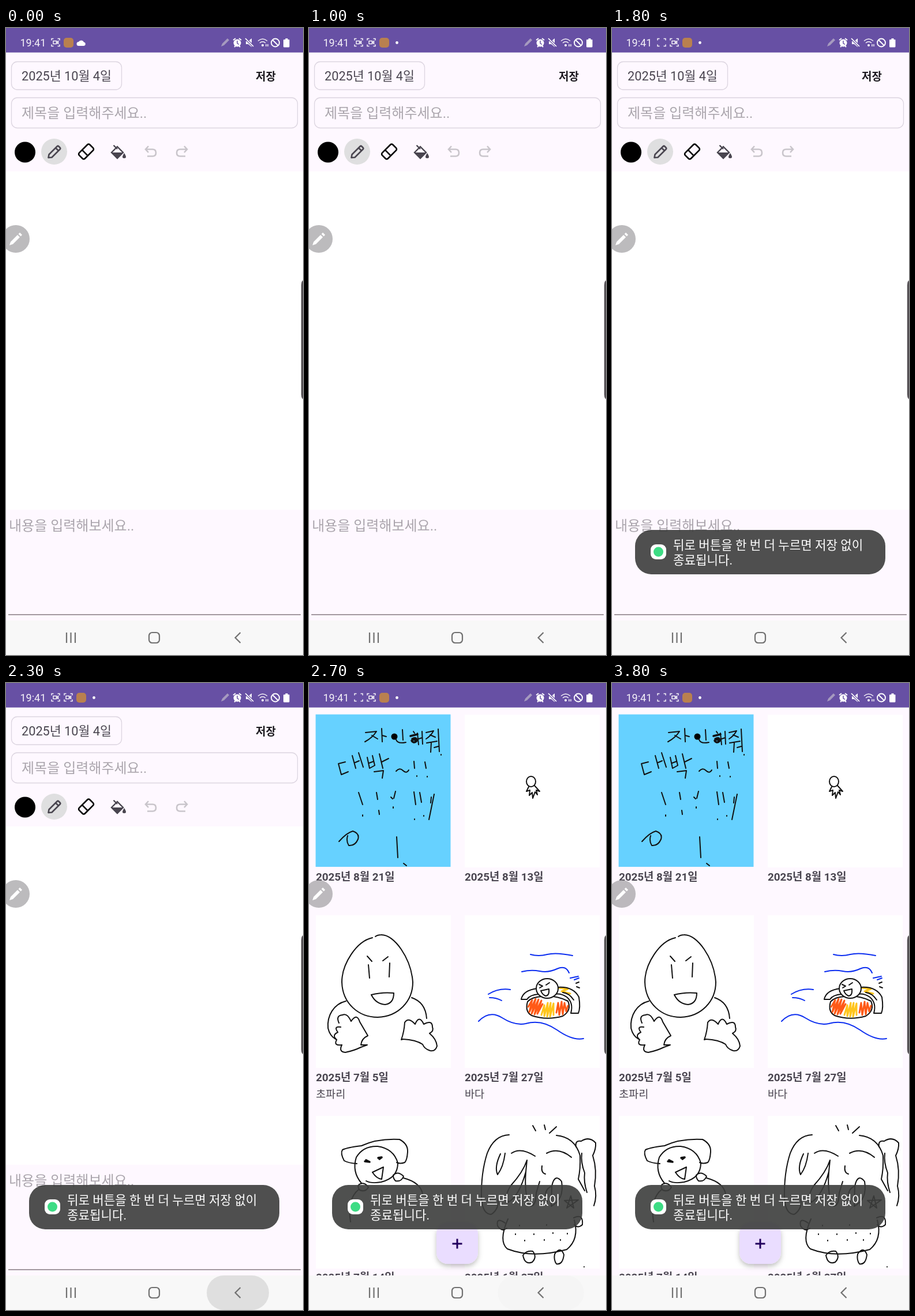
Recreate the animation shown at these times as an HTML page. Size 515 by 1088 pixels, loop 4 s.

```html
<!DOCTYPE html>
<html lang="ko">
<head>
<meta charset="utf-8">
<title>그림일기</title>
<style>
  html, body { margin: 0; width: 100%; height: 100%; overflow: hidden; background: #fef8ff; }
  svg { display: block; width: 515px; height: 1088px; }
  text { font-family: Roboto, "Noto Sans CJK KR", "Noto Sans CJK", sans-serif; fill: #49454f; }
  .hint { font-size: 24px; fill: #aaa5ac; }
  .date { font-size: 18.8px; font-weight: 700; }
  .name { font-size: 18.6px; }
  .line { fill: none; stroke: #111; stroke-width: 2; stroke-linecap: round; stroke-linejoin: round; }
  .bold { stroke-width: 3.6; }
  .sea { stroke: #0b2df0; }
  .red { stroke: #ff5a17; stroke-width: 3; }
  .yellow { stroke: #ffc51c; stroke-width: 3; }
  .box { fill: none; stroke: #dcd5e0; stroke-width: 1.3; }
  .white { fill: #fff; }
  .thin { fill: none; stroke: #f3f0f6; stroke-width: 1.5; }
</style>
</head>
<body>
<svg viewBox="0 0 515 1088">
  <defs>
    <path id="frame" class="thin" d="M79 21.500V18.500H82.500M89.500 18.500H93V21.500M93 28.500V31.500H89.500M82.500 31.500H79V28.500"/>
    <path id="cam" class="thin" d="M82 22.500h5.500v5H82zM87.500 25l3-2.200v4.400z"/>
    <filter id="soft" x="-30%" y="-30%" width="160%" height="170%">
      <feDropShadow dx="0" dy="4" stdDeviation="4" flood-opacity=".25"/>
    </filter>
  </defs>

  <rect width="515" height="1088" fill="#fef8ff"/>

  <g id="list">
    <rect x="11.500" y="54.500" width="234" height="264.500" fill="#66d1ff"/>
    <path class="white" d="M270 55h234v265H270zM12 403h234v265H12zM270 403h234v265H270zM12 751h234v265H12zM270 751h234v265H270z"/>

    <!-- handwriting -->
    <path class="line" d="M98 86L117 84Q110 95 97 102M109 91L119 97M126 79L127 102M127 91L134 93
      M162 81L163 99M151 98Q153 106 168 103M181 84L183 87M188 87L190 107M190 97L196 95M196 84L197 106"/>
    <path class="line bold" d="M176 92L188 89M179 97q7-4 8 3q-5 6-9 0q4-4 8 1"/>
    <path class="line" d="M203 86L216 83Q211 92 203 97M210 90L219 94M204 104L222 101M212 103L211 120M224 80L226 119M217 112L224 110M229 124v1"/>
    <path class="line" d="M63 137L51 140L56 159L68 154M75 126L81 148M80 138L87 135M86 121L94 146M101 129L105 148L114 143L110 126M104 139L112 136
      M122 123L128 148M126 137L138 131M113 154L129 152L127 165M151 153Q157 146 163 152T173 151M182 136L183 148M187 161v1M201 137L203 148M205 162v1"/>
    <path class="line" d="M86 190L93 211M93 229v2M117 190L119 202M121 221L122 228M150 188L147 200M142 198L145 201M146 215v2
      M182 189L185 211M183 236v1M192 190L195 207M199 230v1M217 193L208 237M212 198L211 208
      M52 275Q65 260 76 257Q88 261 85 271Q80 283 69 282Q64 274 67 265M152 267L154 303M164 313L169 317"/>
    <circle cx="148" cy="93" r="5.500"/>

    <!-- small figure -->
    <path class="line" d="M377 171A8 9 0 1 1 393 171A8 9 0 1 1 377 171M381 180L377 188L383 186L382 195L387 190L388 200L392 189L396 194L394 186L400 188L391 178"/>

    <!-- egg-shaped character -->
    <path class="line" d="M110 442C82 448 57 488 57 519C58 556 86 580 119 580C155 579 180 552 180 519C177 478 148 436 125 437Q119 437 115 440"/>
    <path class="line" d="M101 474L109 483M128 482L137 475M103 489L105 512M140 486L139 510M108 541Q127 536 147 538Q147 556 132 558Q116 557 108 541"/>
    <path class="line" d="M64 552C43 557 31 577 33 599Q36 612 46 618M178 546Q202 554 204 582
      M52 590Q46 577 58 576Q66 572 73 587Q83 572 88 588L102 612Q91 617 90 628L101 628L90 632Q78 638 63 641Q51 640 57 628Q42 630 48 619Q39 611 50 606Q42 595 55 597
      M163 618L160 619Q165 605 166 589Q172 579 184 592Q191 575 199 592Q214 584 214 597Q217 604 209 608Q221 618 222 630Q219 640 210 638Q200 635 197 627Q185 619 163 618"/>

    <!-- swimmer -->
    <path class="line sea" d="M384 471Q398 475 413 471T457 473M369 501Q385 497 400 500T430 496T451 503M349 532Q329 529 311 540M313 546Q325 546 334 551M294 587Q313 567 335 581T376 591Q403 583 430 602T476 617M453 512L467 509M460 515L468 512"/>
    <path class="line white" style="fill:#fff" d="M379 553Q374 570 386 577Q412 586 440 578Q456 568 449 552Q427 541 403 544Q386 545 379 553"/>
    <path class="line red" d="M380 562L387 550L382 571L393 548L386 574L398 549L391 575L403 551L396 574L405 557M429 572L432 555L434 576L438 553L440 575L443 555L446 570L449 560"/>
    <path class="line yellow" d="M403 576L408 559L408 578L414 555L413 579L419 555L418 579L424 556L424 576M433 529L449 531L438 535L453 539"/>
    <path class="line" style="fill:#fff" d="M396 530Q371 533 368 549L378 549Q383 541 398 540"/>
    <path class="line" d="M431 528Q458 526 468 545Q471 564 467 573L454 573Q459 555 447 545Q437 538 426 540M440 537Q451 538 459 550M463 521L468 519M464 527L469 529"/>
    <ellipse class="line" style="fill:#fff" cx="413" cy="530" rx="19" ry="17"/>
    <path class="line" d="M399 523L405 526L400 529M411 524L417 520M402 534L416 531Q417 543 410 543Q404 540 402 534"/>

    <!-- character with a hat -->
    <path class="line" d="M83 834Q68 833 61 829Q54 816 58 810Q66 806 91 803Q119 790 157 792Q172 800 171 814Q170 828 166 832Q158 835 152 832"/>
    <path class="line" d="M91 868Q74 848 82 823Q94 803 119 804Q147 808 154 833Q154 859 125 866Q108 869 99 864
      M110 849L129 840L126 861Q117 860 110 849M87 870Q96 865 103 875Q98 884 88 880Q83 874 87 870M146 854Q154 846 164 856Q160 866 150 864Q146 860 146 854
      M86 879Q66 895 72 935M164 859Q194 867 197 887"/>
    <path class="line bold" d="M97 830L105 831L99 828M120 824L126 823L122 826"/>

    <!-- long-haired character -->
    <path class="line" d="M388 768L393 777M408 767L410 775M429 770L417 781
      M347 784Q321 785 309 816Q298 850 299 894Q301 922 316 922Q329 914 328 896
      M332 817Q321 840 327 853Q337 840 340 816M351 816Q367 805 392 821
      M378 828Q371 849 350 872Q337 892 346 901Q365 889 376 848L378 828M376 848Q373 884 382 906Q393 912 394 885L400 865"/>
    <path class="line" d="M404 838Q402 850 410 852M412 816Q433 805 455 823M429 785Q461 788 470 820Q471 843 467 861L478 881
      M463 805Q461 793 472 795Q486 786 497 798Q498 808 492 820Q500 845 495 873Q500 890 494 907M473 816Q471 832 478 850Q476 866 482 884
      M413 900Q405 880 421 873L420 908Q443 896 438 865Q426 850 421 873"/>
    <path class="line" d="M340 937Q324 926 327 942Q334 953 343 946M345 930Q328 969 344 982Q388 999 447 983Q469 965 460 932M459 928Q476 920 474 940Q466 947 460 940
      M447 911L454 890L459 911L443 898L467 897L447 911
      M371 993Q377 984 388 986Q396 996 387 1005Q374 1010 371 993M426 991Q436 976 442 992Q440 1010 429 1008Q424 1001 426 991"/>
    <path class="line" d="M358 956v1M374 967v1M390 956v1M408 966v1M423 954v1M436 966v1M448 955v1M365 941v1M412 940v1M477 1013v.200"/>

    <text class="date" x="12" y="343">2025년 8월 21일</text>
    <text class="date" x="270" y="343">2025년 8월 13일</text>
    <text class="date" x="12" y="691">2025년 7월 5일</text>
    <text class="date" x="270" y="691">2025년 7월 27일</text>
    <text class="name" x="12" y="720">초파리</text>
    <text class="name" x="270" y="720">바다</text>
    <text class="date" x="12" y="1038">2025년 7월 14일</text>
    <text class="date" x="270" y="1038">2025년 6월 27일</text>
    <rect x="221" y="936" width="72" height="72" rx="20" fill="#eaddff" filter="url(#soft)"/>
    <path d="M248.500 973h17M257 964.500v17" stroke="#21005d" stroke-width="3"/>
  </g>

  <g id="editor">
    <rect width="515" height="1030" fill="#fef8ff"/>
    <rect class="box" x="9.500" y="58.500" width="191" height="48.500" rx="10"/>
    <rect class="box" x="9.500" y="121" width="496" height="52.500" rx="10"/>
    <text x="27" y="91" font-size="21.700">2025년 10월 4일</text>
    <text x="433" y="90.500" font-size="19" font-weight="700" style="fill:#1d1b20">저장</text>
    <text class="hint" x="27" y="156">제목을 입력해주세요..</text>
    <circle cx="33" cy="215.500" r="18"/>
    <circle cx="83.500" cy="214.500" r="22.500" fill="#dfdfe0"/>
    <path d="M73.500 225L74.500 219.500L88.500 205.500Q90 204 91.500 205.500L93.500 207.500Q95 209 93.500 210.500L79.500 224.500ZM86 208L91 213" fill="none" stroke="#49454f" stroke-width="2.600" stroke-linejoin="round"/>
    <g transform="rotate(-45 139 214.500)" fill="none" stroke="#000" stroke-width="2.600">
      <rect x="126" y="207.500" width="26" height="14" rx="3"/>
      <path d="M136 207.500v14"/>
    </g>
    <path d="M186.500 203.500L193 210M183 216L193 206L203 216L193 226Z" fill="none" stroke="#49454f" stroke-width="2.400"/>
    <path d="M182 216h22l-11 11zM205 217q6 9 0 9q-6 0 0-9" fill="#49454f"/>
    <g fill="none" stroke="#c9c5cb" stroke-width="2.600">
      <path id="undo" d="M247 205l-5 5.500 5 5.500M242 210.500h12q6 0 6 6t-6 6h-9"/>
      <use href="#undo" transform="matrix(-1 0 0 1 556 0)"/>
    </g>
    <rect class="white" y="249" width="515" height="587"/>
    <text class="hint" x="5" y="871.500">내용을 입력해보세요..</text>
    <path d="M4 1018h507" stroke="#85797f" stroke-width="1.600"/>
  </g>

  <circle cx="17" cy="366" r="24" fill="#a6a4a7" opacity=".75"/>
  <path d="M6 377l2-6 12-12 4 4-12 12zM21.500 357.500l2.500-2.500 4 4-2.500 2.500z" fill="#fff"/>
  <path d="M515 438q-3 2-3 8v190q0 6 3 8z" fill="#4b464b" stroke="#8b868b" stroke-width=".6"/>

  <!-- navigation bar -->
  <rect y="1028" width="515" height="60" fill="#f8f8f8"/>
  <rect id="press" y="1028" height="60" rx="30" fill="#dfdfdf"/>
  <g fill="none" stroke="#717171" stroke-width="2.200">
    <path d="M105 1049v18M112.500 1049v18M120 1049v18M406.500 1049l-9 9 9 9"/>
    <rect x="248" y="1049" width="18" height="18" rx="5.500"/>
  </g>

  <!-- status bar -->
  <rect width="515" height="42.500" fill="#6750a4"/>
  <text x="24.500" y="31.500" font-size="18" style="fill:#f5f2f8">19:41</text>
  <g id="fresh"><use href="#frame"/><use id="blink" href="#cam"/></g>
  <g id="older">
    <use href="#frame"/><use href="#cam"/>
    <rect x="100" y="17" width="17" height="17" rx="5" fill="#b9804f"/>
    <path id="cloud" d="M126 31a3.500 3.500 0 0 1 0-7a5 5 0 0 1 9 .5a3.300 3.300 0 0 1 0 6.500z" fill="#fff"/>
  </g>
  <circle id="dot" cx="152.500" cy="25.500" r="2.400" fill="#fff"/>
  <path d="M373 32l2-5 9-9 3 3-9 9z" fill="#a69abf"/>
  <g fill="#fff">
    <circle cx="401" cy="26" r="6.500"/>
    <path d="M394 21l4-3M404 18l4 3M396 33l2-2M406 33l-2-2" stroke="#fff" stroke-width="2"/>
    <path d="M401 22v4.500l3 2" fill="none" stroke="#6750a4" stroke-width="1.500"/>
    <path d="M416 23h4l6-5v15l-6-5h-4z"/>
    <path d="M415 18l14 14" stroke="#6750a4" stroke-width="4"/>
    <path d="M415 18l14 14" stroke="#fff" stroke-width="1.700"/>
    <circle cx="445" cy="30" r="2"/>
    <path d="M482.500 20h2v-2h4v2h2q1 0 1 1v11q0 1.500-1.500 1.500h-7.500q-1.500 0-1.500-1.500v-11q0-1 1.500-1z"/>
  </g>
  <path class="thin" d="M437 22.500q8-7 16 0M440 26q5-4.500 10 0M451 28v4M454 28v4"/>
  <g fill="none" stroke="#fff" stroke-width="1.900"><circle cx="467" cy="25.500" r="7"/><path d="M462 20.500l10 10"/></g>

  <g id="toast">
    <rect x="40" y="871" width="434" height="77" rx="28" fill="#3c3d3c" opacity=".9"/>
    <rect class="white" x="67" y="896" width="27" height="26" rx="9"/>
    <circle cx="80.500" cy="909" r="8.500" fill="#3ddc84"/>
    <g font-size="21.200">
      <text x="106" y="905" style="fill:#fff">뒤로 버튼을 한 번 더 누르면 저장 없이</text>
      <text x="106" y="930.500" style="fill:#fff">종료됩니다.</text>
    </g>
  </g>
</svg>
<script>
  const LOOP = 4000, STEP = 100, TAPS = [1200, 2300];
  const $ = id => document.getElementById(id);
  const ramp = (t, from, to) => Math.min(1, Math.max(0, (t - from) / (to - from)));
  const ease = p => p * p * (3 - 2 * p);
  const fade = (id, value) => $(id).setAttribute('opacity', value);
  const camOn = [[1000, 1700], [2000, 2600], [3000, 3200], [3500, 3700]];

  // Back-button highlight: quick in, then widens while fading out
  function press(t) {
    const start = t < TAPS[1] - 100 ? TAPS[0] : TAPS[1];
    const out = ramp(t, start + 100, start + 450);
    const width = 108 + 48 * out;
    $('press').setAttribute('x', 402 - width / 2);
    $('press').setAttribute('width', width);
    fade('press', ramp(t, start - 100, start) * (1 - out));
  }

  function draw(now) {
    const t = Math.floor(now % LOOP / STEP) * STEP;
    const shift = ease(ramp(t, 0, 500));

    $('older').setAttribute('transform', `translate(${22 * shift} 0)`);
    fade('fresh', ramp(t, 100, 500));
    fade('cloud', 1 - ramp(t, 0, 300));
    fade('dot', ramp(t, 200, 500));
    fade('blink', camOn.some(([a, b]) => t >= a && t < b) ? 1 : 0);

    press(t);
    const pop = ease(ramp(t, 1200, 1600));
    fade('toast', pop);
    $('toast').setAttribute('transform', `translate(257 909) scale(${0.9 + 0.1 * pop}) translate(-257 -909)`);
    fade('editor', 1 - ease(ramp(t, 2350, 2650)));
    requestAnimationFrame(draw);
  }
  requestAnimationFrame(draw);
</script>
</body>
</html>
```
